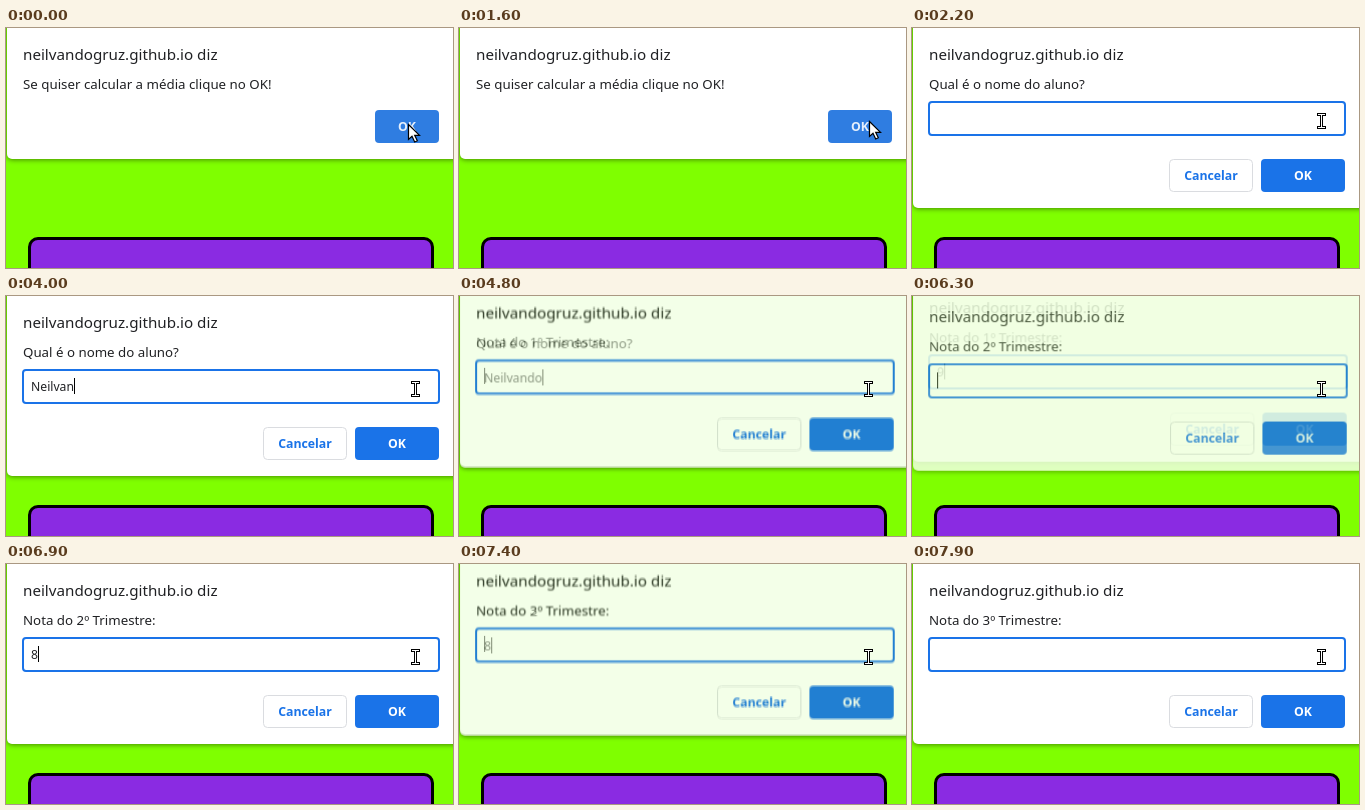
These frames come from a looping animation (447 px wide and 240 px high, 8000 ms). An HTML page with a canvas:

```html
<!DOCTYPE html>
<html lang="pt">
<head>
<meta charset="utf-8">
<style>
  html, body { margin: 0; overflow: hidden; background: #7fff00; }
  canvas { display: block; }
</style>
</head>
<body>
<canvas id="stage" width="447" height="240"></canvas>
<script>
const WIDTH = 447, HEIGHT = 240, LOOP = 8000, TICK = 100, BLINK = 500;
const FONT = '"Noto Sans", "Open Sans", sans-serif';
const INK = '#202124', BLUE = '#1a73e8';
const stage = document.getElementById('stage').getContext('2d');
const layerCanvas = document.createElement('canvas');
layerCanvas.width = WIDTH;
layerCanvas.height = HEIGHT;
const layer = layerCanvas.getContext('2d');

// Each key time types the next letters, up to the given count.
const dialogs = [
  { opens: -1000, closes: 1700, message: 'Se quiser calcular a média clique no OK!', alert: true },
  { opens: 1700, closes: 4700, message: 'Qual é o nome do aluno?', value: 'Neilvando',
    keys: [[2600, 1], [2900, 2], [3100, 3], [3600, 4], [3900, 6], [4000, 7], [4200, 8], [4300, 9]] },
  { opens: 4800, closes: 6200, message: 'Nota do 1º Trimestre:', value: '9', keys: [[5700, 1]] },
  { opens: 6200, closes: 7400, message: 'Nota do 2º Trimestre:', value: '8', keys: [[6900, 1]] },
  { opens: 7400, closes: LOOP, message: 'Nota do 3º Trimestre:', value: '', keys: [] }
];

// Poses of a dialog sliding in and of the one sliding out behind it.
const ENTER = [{ lift: 10.5, alpha: 0.46 }, { lift: 6, alpha: 0.75 }];
const LEAVE = [{ lift: 9, alpha: 0.83 }, { lift: 15, alpha: 0.55 }];
const REST = { lift: 0, alpha: 1 };

function box(c, x, y, w, h, radius, fill, stroke, lineWidth = 1) {
  const inset = stroke ? lineWidth / 2 : 0;
  c.beginPath();
  c.roundRect(x + inset, y + inset, w - 2 * inset, h - 2 * inset, radius);
  if (fill) { c.fillStyle = fill; c.fill(); }
  if (stroke) { c.strokeStyle = stroke; c.lineWidth = lineWidth; c.stroke(); }
}

function text(string, x, y, size, color = INK, weight = 400, align = 'left') {
  layer.font = `${weight} ${size}px ${FONT}`;
  layer.fillStyle = color;
  layer.textAlign = align;
  layer.fillText(string, x, y);
}

function button(label, x, y, w, fill, color, border) {
  box(layer, x, y, w, 33, 4, fill, border);
  text(label, x + w / 2, y + 21, 12.3, color, 600, 'center');
}

function panel(message, height) {
  layer.clearRect(0, 0, WIDTH, HEIGHT);
  layer.save();
  layer.shadowColor = 'rgba(0,0,0,.45)';
  layer.shadowBlur = 5;
  layer.shadowOffsetY = 1;
  box(layer, 1, -20, WIDTH + 8, height + 20, 5, '#fff');
  layer.restore();
  text('neilvandogruz.github.io diz', 17, 32, 15.2);
  text(message, 17, 61, 13.3);
}

function alertBody() {
  button('OK', 369, 82, 64, '#2f7de1', 'rgba(255,255,255,.88)');
}

function promptBody({ opens, value, keys }, time) {
  let count = 0;
  for (const [at, letters] of keys) if (time >= at) count = letters;
  const typed = value.slice(0, count);

  box(layer, 16, 73, 418, 35, 3, '#fff', BLUE, 2);
  text(typed, 25, 95, 12.2);
  if (count || time < opens + BLINK) {
    layer.fillStyle = '#000';
    layer.fillRect(25 + Math.round(layer.measureText(typed).width), 82, 1, 16);
  }
  button('Cancelar', 257, 131, 84, '#fff', BLUE, '#dadce0');
  button('OK', 349, 131, 84, BLUE, '#fff');
}

function drawDialog(dialog, time, { lift, alpha }) {
  panel(dialog.message, dialog.alert ? 131 : 180);
  if (dialog.alert) alertBody();
  else promptBody(dialog, time);

  // The window is slightly enlarged while it slides.
  const scale = lift ? 1.004 : 1;
  stage.globalAlpha = alpha;
  stage.drawImage(layerCanvas, 0, -lift, WIDTH * scale, HEIGHT * scale);
  stage.globalAlpha = 1;
}

function drawDialogs(time) {
  const index = dialogs.findLastIndex(d => time >= d.opens);
  const current = dialogs[index], previous = dialogs[index - 1];
  const step = (time - current.opens) / TICK;
  if (previous && LEAVE[step]) drawDialog(previous, time, LEAVE[step]);
  drawDialog(current, time, time >= current.closes ? LEAVE[0] : ENTER[step] || REST);
}

function drawArrow(x, y) {
  stage.save();
  stage.translate(x + 0.5, y + 0.5);
  const arrow = new Path2D('M0 0V15L3.5 11.8L6.2 17.5L8.8 16.3L6.2 10.8H11Z');
  stage.fillStyle = '#fff';
  stage.strokeStyle = '#000';
  stage.lineWidth = 1.2;
  stage.fill(arrow);
  stage.stroke(arrow);
  stage.restore();
}

function drawBeam(x, y) {
  const beam = new Path2D(`M${x - 3} ${y - 6}H${x + 3}M${x} ${y - 6}V${y + 7}M${x - 3} ${y + 7}H${x + 3}`);
  stage.lineCap = 'square';
  for (const [color, width] of [['#000', 3], ['#fff', 1]]) {
    stage.strokeStyle = color;
    stage.lineWidth = width;
    stage.stroke(beam);
  }
}

function drawPointer(time) {
  if (time >= dialogs[0].closes) return drawBeam(409.5, 92.5);
  if (time < TICK) return drawArrow(402, 96);
  // Rests at the left of the button, then drifts right until the click.
  const travel = Math.min(1, Math.max(0, (time - 800) / 800));
  drawArrow(392 + 18 * travel, 94 - travel);
}

function draw(now) {
  const time = Math.floor(now % LOOP / TICK) * TICK;
  stage.fillStyle = '#7fff00';
  stage.fillRect(0, 0, WIDTH, HEIGHT);
  box(stage, 22, 209, 406, 60, 8.5, '#8a2be2', '#000', 3);
  drawDialogs(time);
  drawPointer(time);
}

const start = performance.now();
function loop() {
  draw(performance.now() - start);
  requestAnimationFrame(loop);
}
loop();
</script>
</body>
</html>
```
